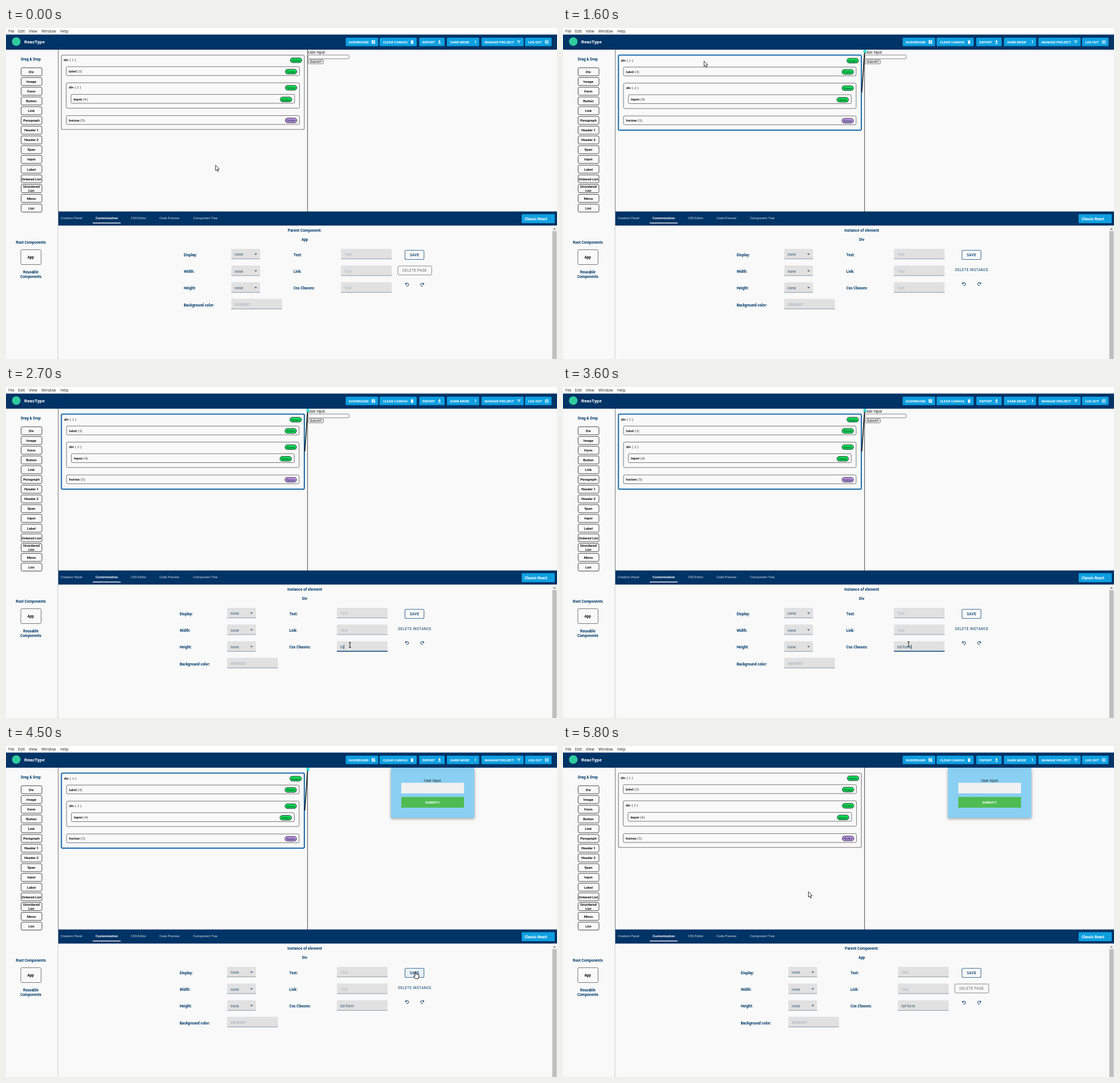
Recreate the animation shown at these times as an HTML page with a canvas. Size 966 px wide and 580 px high, loop 5900 ms.

```html
<!DOCTYPE html>
<html lang="en">
<head>
<meta charset="utf-8">
<title>Component editor</title>
<style>
html, body { margin: 0; width: 100%; height: 100%; overflow: hidden; background: #f9f9f9; }
canvas { display: block; }
</style>
</head>
<body>
<canvas id="stage" width="966" height="580"></canvas>
<script>
const c = document.getElementById('stage').getContext('2d');
const LOOP = 5900;
const NAVY = '#003366', BLUE = '#0d9fe1', INK = '#003b6b', BG = '#f9f9f9';
const SANS = 'Roboto, sans-serif', ARIAL = '"Liberation Sans", sans-serif', SERIF = '"Liberation Serif", serif';

// Moments of the interaction, in ms
const SELECT = 1500, FOCUS = 2300, TYPE = 2600, KEY = 100, BLUR = 4200, SAVED = 4500, DESELECT = 5500;
const CLASS_NAME = 'tst-form';
const PATH = [
  [100, 367, 240], [1100, 257, 62], [1450, 247, 57.5], [1700, 247, 57.5], [2250, 603, 452],
  [3550, 603, 452], [4100, 723, 398], [4450, 723, 398], [5100, 424, 253.5], [5500, 430, 255]
];

const clamp = v => Math.max(0, Math.min(1, v));
const easeOut = p => 1 - (1 - clamp(p)) ** 3;
const smooth = p => p * p * (3 - 2 * p);

function rect(x, y, w, h, fill) {
  c.fillStyle = fill;
  c.fillRect(x, y, w, h);
}

function box(x, y, w, h, r, fill, stroke, line = 1) {
  c.beginPath();
  c.roundRect(x, y, w, h, r);
  if (fill) { c.fillStyle = fill; c.fill(); }
  if (stroke) { c.strokeStyle = stroke; c.lineWidth = line; c.stroke(); }
}

function path(points, stroke, line = 1, fill) {
  c.beginPath();
  points.forEach(([x, y]) => c.lineTo(x, y));
  if (fill) { c.closePath(); c.fillStyle = fill; c.fill(); }
  if (stroke) { c.strokeStyle = stroke; c.lineWidth = line; c.stroke(); }
}

// y is the middle of the capital letters; returns the text width
function text(s, x, y, size, color, { weight = 400, font = SANS, align = 'left', space = 0 } = {}) {
  c.font = `${weight} ${size}px ${font}`;
  c.letterSpacing = space + 'px';
  c.textAlign = align;
  c.fillStyle = color;
  c.fillText(s, x, y + size * .36);
  return c.measureText(s).width;
}

const bold = { weight: 700 };
const boldMid = { weight: 700, align: 'center' };

const icons = {
  grid() {
    for (const [x, y, h] of [[-3, -3, 3.4], [-3, 1, 2], [.4, -3, 2], [.4, -.4, 3.4]]) rect(x, y, 2.7, h, '#fff');
  },
  trash() {
    rect(-2.4, -3, 4.8, 1, '#fff');
    rect(-2, -1.6, 4, 4.8, '#fff');
  },
  download() {
    path([[-1, -3], [1, -3], [1, -.8], [2.4, -.8], [0, 1.6], [-2.4, -.8], [-1, -.8]], null, 0, '#fff');
    rect(-2.5, 2.2, 5, 1, '#fff');
  },
  moon() {
    c.beginPath();
    c.arc(-1, 0, 3, -1.5, 1.5);
    c.arc(-2.6, 0, 3.4, 1.1, -1.1, true);
    c.fillStyle = '#fff';
    c.fill();
  },
  filter() {
    rect(-3, -2.3, 6, .9, '#fff');
    rect(-2, -.4, 4, .9, '#fff');
    rect(-.8, 1.5, 1.6, .9, '#fff');
  },
  exit() {
    box(-2.5, -2.7, 5.4, 5.4, .5, null, '#fff', .9);
    path([[-3.2, 0], [1.2, 0]], '#fff', .9);
    path([[-.3, -1.5], [1.2, 0], [-.3, 1.5]], '#fff', .9);
  }
};

function header() {
  rect(0, 0, 966, 11.5, '#fff');
  [['File', 4], ['Edit', 21], ['View', 40], ['Window', 62], ['Help', 95]].forEach(([s, x]) =>
    text(s, x, 5.8, 6.8, '#222', { font: '"Open Sans", sans-serif' }));
  rect(0, 11.5, 966, 26.5, NAVY);
  c.beginPath();
  c.arc(18, 23.7, 7.5, 0, 7);
  c.fillStyle = '#2fcb9e';
  c.fill();
  text('ReacType', 32, 24, 8.1, '#fff', bold);
  [
    ['DASHBOARD', 595.5, 57, 601, 644, 'grid'],
    ['CLEAR CANVAS', 655, 65, 661, 712, 'trash'],
    ['EXPORT', 724.5, 44.5, 730, 760, 'download'],
    ['DARK MODE', 773, 56.5, 779, 822, 'moon'],
    ['MANAGE PROJECT', 833.5, 74, 839, 899, 'filter'],
    ['LOG OUT', 910, 46.5, 915.5, 948, 'exit']
  ].forEach(([s, x, w, tx, ix, icon]) => {
    box(x, 17, w, 14.7, 1.5, BLUE);
    text(s, tx, 24.6, 5.9, '#fff', bold);
    c.save();
    c.translate(ix, 24.5);
    icons[icon]();
    c.restore();
  });
}

function sidebar() {
  rect(91, 38, 1, 284, '#777');
  rect(90.5, 346, 1, 234, '#ccc');
  text('Drag & Drop', 43.5, 55, 6.5, INK, boldMid);
  ['Div', 'Image', 'Form', 'Button', 'Link', 'Paragraph', 'Header 1', 'Header 2', 'Span', 'Input',
    'Label', 'Ordered List', 'Unordered|List', 'Menu', 'List'].forEach((s, i) => {
    const y = 76.7 + 17.06 * i, lines = s.split('|');
    box(26.5, y - 7, 36.5, 14, 2, null, '#4a4a4a');
    lines.forEach((line, k) => text(line, 44.5, y + (k - (lines.length - 1) / 2) * 7, 6.2, '#111', boldMid));
  });
  text('Root Components', 43.5, 376, 6.5, INK, boldMid);
  box(26, 388.5, 35.5, 26, 2, null, '#777');
  text('App', 43.2, 401.7, 6.5, '#111', boldMid);
  text('Reusable', 43.5, 427.7, 6.5, INK, boldMid);
  text('Components', 43.5, 436, 6.5, INK, boldMid);
}

function node(name, id, x, y, pillX, pillY, purple) {
  const w = text(name, x, y, 6.6, '#111', { weight: 700, font: SERIF });
  text(' ' + id, x + w, y, 6.6, '#222', { font: SERIF });
  box(pillX - 10.2, pillY - 4.2, 20.4, 8.4, 4.2, purple ? '#b98be0' : '#10dc50', '#334', .9);
  text('Notes', pillX, pillY + .2, 5.9, '#123a3a', { font: ARIAL, align: 'center' });
}

function tree(selected) {
  const d = selected ? .6 : 0, edge = '#777';
  box(97.2, 47.5, 425.8, 130.3 + d * 2, 2, null, selected ? '#1a6cab' : edge, selected ? 2 : 1.1);
  const inner = (x, y, w, h) => box(x + d, y + d, w - 2 * d, h, 2, null, edge);
  inner(105.5, 67.8, 409, 15.5);
  inner(105.5, 96, 409, 44.5);
  inner(114, 116.3, 392, 15.6);
  inner(105.5, 153.5, 409, 15.5);
  node('div', '( 1 )', 101 + d, 55.6 + d, 508.5 - d, 56.6 + d);
  node('label', '(3)', 110 + d, 75.8 + d, 499.8 - d, 76.4 + d);
  node('div', '( 2 )', 110 + d, 104 + d, 499.8 - d, 104.8 + d);
  node('input', '(4)', 118.5 + d, 124.5 + d, 491 - d, 125.2 + d);
  node('button', '(5)', 110 + d, 161.5 + d, 499.8 - d, 162 + d, true);
}

function preview(styled) {
  rect(528, 38, 1.2, 284, '#666');
  if (!styled) {
    text('User Input', 529.5, 43, 6.4, '#111', { font: ARIAL });
    box(529.5, 47.3, 72, 6.6, 1, '#fff', '#777', .9);
    box(530, 55.6, 26.5, 7.2, 1.5, '#efefef', '#777', .9);
    text('Submit!!!', 543.3, 59.3, 5.4, '#111', { font: ARIAL, align: 'center' });
    return;
  }
  c.save();
  c.shadowColor = 'rgba(0,0,0,.4)';
  c.shadowBlur = 5;
  c.shadowOffsetY = 1.5;
  c.beginPath();
  c.rect(665, 38, 170, 100);
  c.clip();
  rect(675, 38, 146, 88, '#89d0f3');
  c.restore();
  text('User Input', 747.5, 60.7, 6.4, '#222', { font: ARIAL, align: 'center' });
  rect(693, 64.5, 110, 18.5, '#f1f1f1');
  rect(693, 89.3, 110, 18.7, '#4fbc53');
  text('SUBMIT!!!', 747.7, 98.7, 5.3, '#fff', { weight: 700, font: ARIAL, align: 'center' });
}

function connector() {
  path([[523.8, 113], [528.8, 41]], '#111', 1.6);
  rect(526.8, 38.5, 5, 5, '#2adfd6');
}

function tabs() {
  rect(91.5, 321.5, 874.5, 24.7, NAVY);
  [['Creation Panel', 96], ['Customization', 157], ['CSS Editor', 219], ['Code Preview', 269], ['Component Tree', 328]]
    .forEach(([s, x], i) => text(s, x, 333, i == 1 ? 6 : 5.8, i == 1 ? '#fff' : '#d5dde6', { weight: i == 1 ? 700 : 400 }));
  rect(152, 341, 49, 1.3, '#fff');
  box(904, 326.3, 58, 15.7, 1.5, BLUE);
  text('Classic React', 909, 334.4, 6.5, '#fff', bold);
  path([[952.8, 333.8], [954.5, 335.3], [956.2, 333.8]], '#3a6688', .9);
  rect(957, 346.2, 9, 234, '#f1f1f1');
  rect(957.8, 356, 7.6, 224, '#bfbfbf');
  path([[959.3, 353.3], [961.6, 350.6], [963.9, 353.3]], null, 0, '#777');
}

function field(x, y, w, value, color) {
  box(x, y, w, 17.8, [2, 2, 0, 0], '#e1e1e1');
  rect(x, y + 17.2, w, .9, '#8593a3');
  return text(value, x + 6, y + 10, 6.7, color);
}

function turnArrow(x, y, flip) {
  c.save();
  c.translate(x, y);
  c.scale(flip, 1);
  c.beginPath();
  c.arc(0, .4, 2.6, -2.5, 2.1);
  c.strokeStyle = NAVY;
  c.lineWidth = 1;
  c.stroke();
  path([[-3.4, -3], [-3.4, .2], [-.3, .2]], null, 0, NAVY);
  c.restore();
}

function form(t, selected, hover) {
  const dx = selected ? -7.3 : 0, soft = '#a9b3bc';
  text(selected ? 'Instance of element' : 'Parent Component:', 523.7, 354.7, 6.8, INK, boldMid);
  text(selected ? 'Div' : 'App', 523.7, 371, 6.5, INK, boldMid);
  ['Display:', 'Width:', 'Height:', 'Background color:'].forEach((s, i) => {
    const y = 387 + 29.3 * i;
    text(s, 311.7 + dx, y + 10.4, 6.5, INK, bold);
    if (i == 3) return field(395 + dx, y - .3, 89, '#B6B8B7', soft);
    field(395 + dx, y, 50.5, 'none', '#2f5878');
    path([[435.3 + dx, y + 8.2], [440.3 + dx, y + 8.2], [437.8 + dx, y + 10.9]], null, 0, '#53697c');
  });

  const typed = CLASS_NAME.slice(0, Math.max(0, Math.floor((t - TYPE) / KEY) + 1));
  const focused = t >= FOCUS && t < BLUR;
  ['Text:', 'Link:', 'Css Classes:'].forEach((s, i) => {
    const x = 587.3 + dx, y = 387 + 29.3 * i;
    text(s, 504 + dx, y + 10.4, 6.5, INK, bold);
    if (i < 2 || !typed) field(x, y, 89, 'Text', soft);
    else {
      const w = field(x, y, 89, typed, '#2f5878');
      if (focused) caret(x + 6.3 + w, y);
    }
    if (i == 2) {
      if (focused && !typed) caret(x + 6, y);
      const w = 89 * (easeOut((t - FOCUS) / 200) - easeOut((t - BLUR) / 200));
      if (w > 0) rect(x + 44.5 - w / 2, y + 16.7, w, 1.5, '#1b4f8a');
    }
  });

  function caret(x, y) {
    const lastKey = t < TYPE ? FOCUS : Math.min(t, TYPE + KEY * (CLASS_NAME.length - 1));
    if ((t - lastKey) % 1000 < 500) rect(x, y + 6, .9, 7.6, NAVY);
  }

  box(699.5, 389.5, 33.3, 16, 2, hover ? '#e9f0f6' : null, '#44749b', 1.1);
  const caps = { align: 'center', space: .35, weight: 500 };
  text('SAVE', 716.3, 397.6, 6.3, INK, caps);
  if (!selected) box(687, 417, 59.3, 15.8, 2, null, '#888');
  text(selected ? 'DELETE INSTANCE' : 'DELETE PAGE', 716.5, selected ? 424.2 : 424.8, 6.3, selected ? INK : '#666', { ...caps, weight: 400 });
  const y = selected ? 448.2 : 449.3;
  turnArrow(703.3, y, 1);
  turnArrow(729.5, y, -1);
}

function pointer(t) {
  let i = PATH.findIndex(k => k[0] > t);
  if (i < 0) return PATH.at(-1).slice(1);
  if (i == 0) return PATH[0].slice(1);
  const [t0, x0, y0] = PATH[i - 1], [t1, x1, y1] = PATH[i];
  const p = smooth((t - t0) / (t1 - t0));
  return [x0 + (x1 - x0) * p, y0 + (y1 - y0) * p];
}

const inside = ([x, y], l, t, r, b) => x > l && x < r && y > t && y < b;

function cursor([x, y], kind) {
  c.save();
  c.translate(x, y);
  c.lineJoin = 'round';
  if (kind == 'text') {
    path([[0, -4.3], [0, 4.3]], '#111', 1);
    for (const end of [-4.3, 4.3]) path([[-1.9, end], [1.9, end]], '#111', .9);
  } else if (kind == 'hand') {
    path([[-.8, .3], [.7, .3], [1, 4.2], [2.7, 4.2], [4.3, 4.8], [6, 5.6], [6.3, 8], [5, 12.3], [-.1, 12.3],
      [-3.2, 7.8], [-2.5, 7], [-.8, 8.2], [-.8, .3]], '#111', 1, '#fff');
  } else {
    path([[.3, .3], [.3, 9.8], [2.4, 7.8], [4, 11.6], [5.6, 10.9], [4, 7.3], [6.9, 7.1], [.3, .3]], '#222', .9, '#fff');
  }
  c.restore();
}

function draw(t) {
  const selected = t >= SELECT && t < DESELECT;
  const at = pointer(t);
  const hover = inside(at, 699, 389, 733, 406);
  const overField = inside(at, 580, 445, 669, 464);
  rect(0, 0, 966, 580, BG);
  header();
  sidebar();
  tree(selected);
  preview(t >= SAVED);
  if (selected) connector();
  tabs();
  form(t, selected, hover);
  cursor(at, hover ? 'hand' : overField ? 'text' : 'arrow');
}

const start = performance.now();
function tick() {
  draw((performance.now() - start) % LOOP);
  requestAnimationFrame(tick);
}
tick();
</script>
</body>
</html>
```
